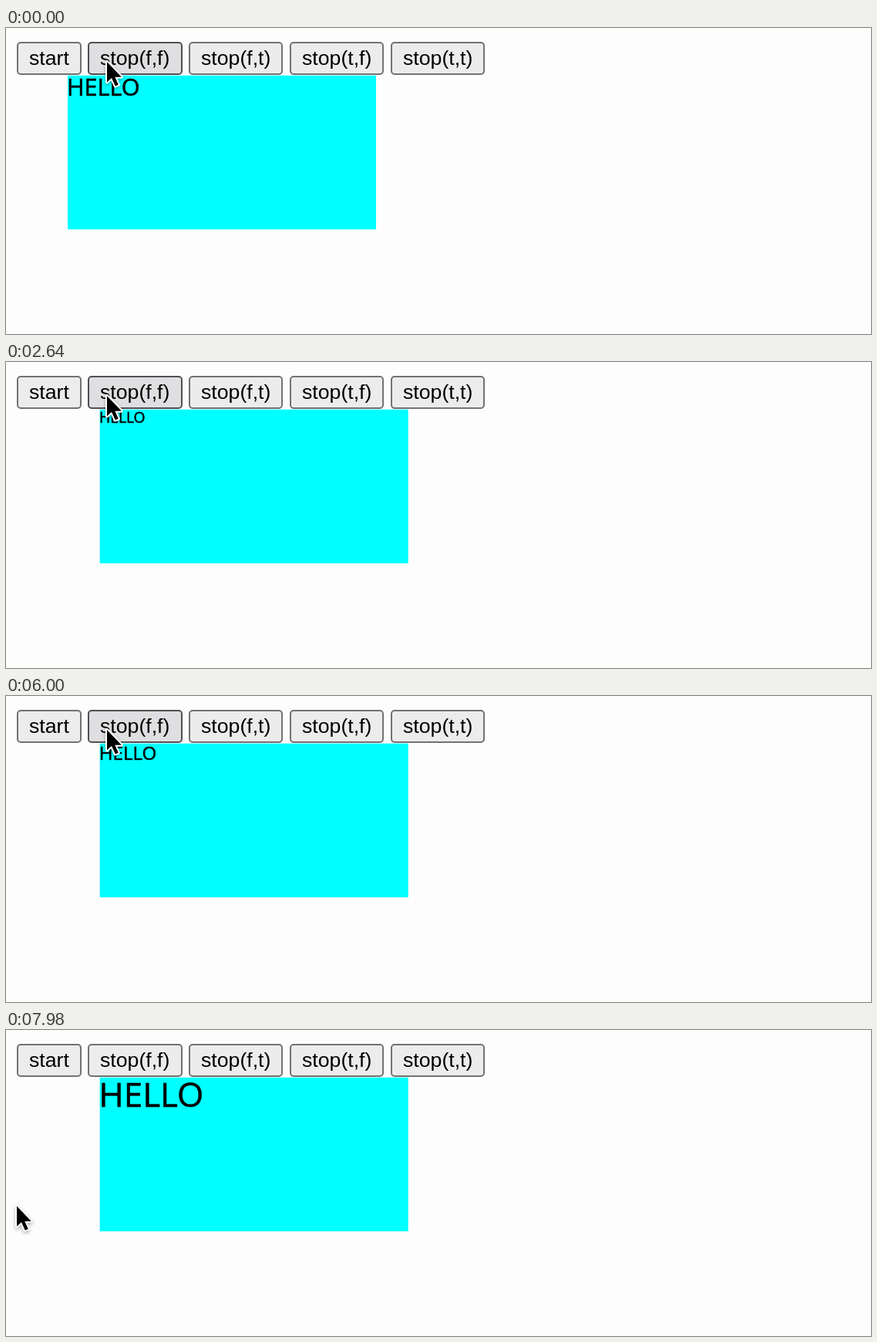
Animation of 1122 by 398 pixels, one loop 8000 ms. Source, as an HTML page:

```html
<!DOCTYPE html>
<html lang="en">
<head>
<meta charset="utf-8">
<title>Animation queue</title>
<style>
  html, body { margin: 0; width: 100%; height: 100%; overflow: hidden; background: #fdfdfd; }
  svg { display: block; width: 1122px; height: 398px; }
  .button rect { fill: #ececec; stroke: #727272; stroke-width: 2; }
  .button.hover rect { fill: #dfdfe1; stroke: #505052; }
  .button text { font: 26.667px "Liberation Sans", Arial, sans-serif; }
  #label { font-family: "Open Sans", "Noto Sans", sans-serif; stroke: #000; stroke-width: .5; }
  #cursor { filter: drop-shadow(0 2px 2px rgba(0, 0, 0, .3)); }
  #cursor path { stroke: #fff; stroke-width: 4; stroke-linejoin: round; paint-order: stroke; }
</style>
</head>
<body>
<svg viewBox="0 0 1122 398">
  <g class="button"><rect x="15" y="19" width="82" height="41" rx="4"/><text x="30" y="48">start</text></g>
  <g class="button" id="stop"><rect x="107" y="19" width="121" height="41" rx="4"/><text x="122" y="48">stop(f,f)</text></g>
  <g class="button"><rect x="238" y="19" width="120" height="41" rx="4"/><text x="253" y="48">stop(f,t)</text></g>
  <g class="button"><rect x="369" y="19" width="120" height="41" rx="4"/><text x="384" y="48">stop(t,f)</text></g>
  <g class="button"><rect x="500" y="19" width="120" height="41" rx="4"/><text x="515" y="48">stop(t,t)</text></g>
  <rect id="box" y="61.8" width="400" height="200" fill="#0ff"/>
  <text id="label">HELLO</text>
  <g id="cursor"><path d="M0 0V26.5L6 21L10.7 31.5L14.8 29.8L10.3 19.7H18.8Z"/></g>
</svg>
<script>
  const LOOP = 8000;
  const START_LEFT = 80, STOP_LEFT = 121.7;
  const BIG = 30.6, SMALL = 19.3;
  const STOP_STEP = 28, GROW_STEP = 118.7;
  // step, x, y
  const path = [[138, 131, 44], [143, 102, 63], [150, 42, 164], [158, 15, 221], [161, 14, 229]];

  const $ = id => document.getElementById(id);
  const stop = $('stop'), box = $('box'), label = $('label'), cursor = $('cursor');

  // Steps come in threes, held for 20, 20 and 100 ms.
  function stepAt(ms) {
    const u = ms + 20, r = u % 140;
    return 3 * Math.floor(u / 140) + (r < 20 ? 0 : r < 40 ? 1 : 2);
  }

  function cursorAt(step) {
    const i = path.findIndex(p => p[0] > step);
    if (i === 0) return path[0].slice(1);
    if (i < 0) return path[path.length - 1].slice(1);
    const a = path[i - 1], b = path[i];
    const k = (step - a[0]) / (b[0] - a[0]);
    return [1, 2].map(j => a[j] + (b[j] - a[j]) * k);
  }

  function draw(ms) {
    const step = stepAt(ms);
    const moving = step < STOP_STEP;
    const left = moving
      ? Math.min(START_LEFT + (step - 1) * 22 / 14, STOP_LEFT)
      : STOP_LEFT;
    const size = moving ? BIG : SMALL + Math.max(0, step - GROW_STEP) * 0.465;
    const [x, y] = cursorAt(step);

    box.setAttribute('x', left);
    label.setAttribute('x', left - size * 0.035);
    label.setAttribute('y', 62 + size * 0.86);
    label.setAttribute('font-size', size);
    cursor.setAttribute('transform', `translate(${x} ${y})`);
    stop.classList.toggle('hover', x > 106 && y < 60);
  }

  function tick() {
    draw(performance.now() % LOOP);
    requestAnimationFrame(tick);
  }
  tick();
</script>
</body>
</html>
```
